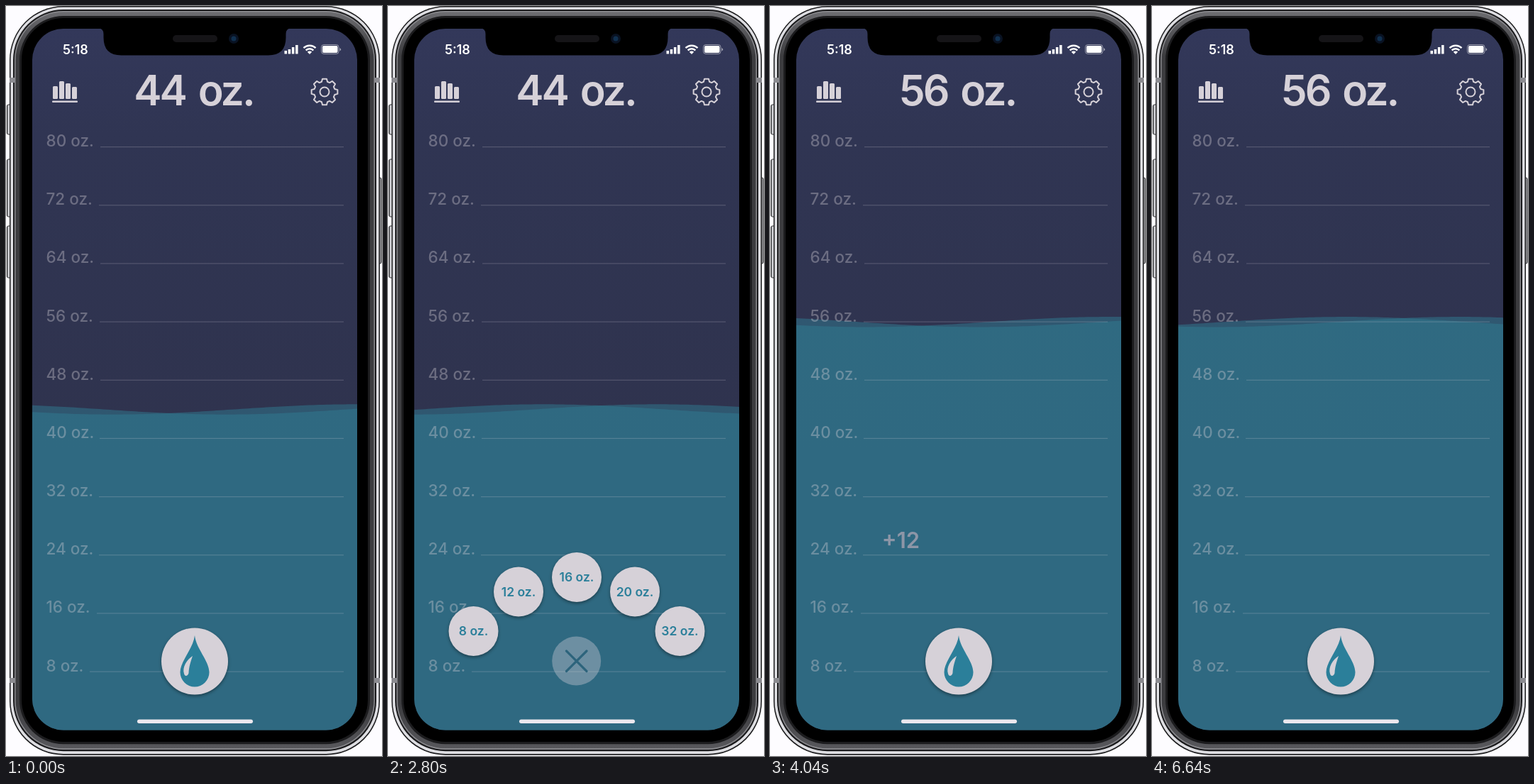
Animation, 530 px wide and 1057 px high, one loop 6680 ms. Source, as an HTML page:

```html
<!DOCTYPE html>
<html lang="en">
<head>
<meta charset="utf-8">
<title>Water tracker</title>
<style>
  html, body { margin: 0; width: 100%; height: 100%; overflow: hidden; background: #fdfcff; }
  svg { display: block; width: 530px; height: 1057px; font-family: Inter, "Liberation Sans", sans-serif; }
  .pale { fill: #d6d1d8; }
  .teal { fill: #2b7f9a; }
  .raised { filter: drop-shadow(0 2px 2px rgba(0, 0, 0, .4)); }
  .label { font-size: 22.5px; font-weight: 500; }
  .choice { font-size: 17.5px; font-weight: 600; text-anchor: middle; }
  #total { font-size: 59px; font-weight: 600; letter-spacing: -3px; word-spacing: 6px; text-anchor: middle; }
  #plus { fill: #d0b6c2; font-size: 31px; font-weight: 600; text-anchor: middle; }
</style>
</head>
<body>
<svg viewBox="0 0 530 1057">
  <defs>
    <linearGradient id="sky" x2="0" y2="1">
      <stop stop-color="#33385a"/>
      <stop offset=".15" stop-color="#303553"/>
      <stop offset=".6" stop-color="#2f334e"/>
    </linearGradient>
    <linearGradient id="steel" x2="1" y2="0">
      <stop stop-color="#77777b"/>
      <stop offset=".5" stop-color="#e6e6ea"/>
      <stop offset="1" stop-color="#66666a"/>
    </linearGradient>
    <linearGradient id="rim" x2="0" y2="1">
      <stop stop-color="#6c6c70"/>
      <stop offset=".06" stop-color="#3c3c3f"/>
      <stop offset=".94" stop-color="#3c3c3f"/>
      <stop offset="1" stop-color="#58585c"/>
    </linearGradient>
    <clipPath id="screen"><rect x="37" y="32" width="458" height="988.500" rx="44"/></clipPath>
  </defs>

  <g id="keys" fill="url(#steel)" stroke="#2a2a2c"></g>
  <g id="body"></g>
  <path d="M5 101h8v7h-8zM519 101h8v7h-8zM5 947h8v7h-8zM519 947h8v7h-8z" fill="#8b8b90"/>

  <g clip-path="url(#screen)">
    <rect x="37" y="32" width="458" height="989" fill="url(#sky)"/>
    <g fill="#307d92" fill-opacity=".5"><path class="wave"/><path class="wave"/></g>
    <g id="scale" class="pale"></g>

    <text x="80" y="67.500" fill="#fff" font-size="18" font-weight="600">5:18</text>
    <text id="total" class="pale" x="264.500" y="140"></text>
    <g class="pale">
      <rect x="66" y="113" width="7" height="18" rx="1.500"/>
      <rect x="75" y="106" width="7" height="25" rx="1.500"/>
      <rect x="84" y="109" width="7" height="22" rx="1.500"/>
      <rect x="93" y="114" width="7" height="17" rx="1.500"/>
      <rect x="65" y="133.500" width="36" height="2.500" rx="1"/>
    </g>
    <g fill="none" stroke="#d6d1d8" stroke-width="2" stroke-linejoin="round">
      <path id="gear"/>
      <circle cx="449" cy="121" r="6.500"/>
    </g>

    <text id="plus" x="184.500"></text>
    <g id="close">
      <circle class="pale" cx="265.700" cy="923" r="34.500" opacity=".37"/>
      <path d="M251.500 909l28.500 28.500m0-28.500l-28.500 28.500" stroke="#2d647c" stroke-width="3.200" stroke-linecap="round"/>
    </g>
    <g id="menu"></g>
    <g id="drop" class="raised">
      <circle class="pale" cx="266" cy="923.500" r="47"/>
      <path class="teal" d="M266 887C268 906 286.500 923 286.500 939A20.500 20.500 0 0 1 245.500 939C245.500 923 264 906 266 887Z"/>
      <path class="pale" d="M263 916C255 921 248 932 251 941C252 946 257 944 257.500 940C258 931 260 925 263 916Z"/>
    </g>
    <rect x="185" y="1005.500" width="163" height="5.500" rx="2.750" fill="#ece8ee"/>
  </g>

  <path d="M129 31q8.500 0 8.500 8.500v5q0 25 25 25h207q25 0 25-25v-5q0-8.500 8.500-8.500z"/>
  <rect x="235" y="41" width="63" height="10" rx="5" fill="#151417"/>
  <circle cx="321" cy="46" r="7" fill="#091222"/>
  <circle cx="321" cy="46" r="3.500" fill="#10304f"/>

  <g fill="#fff">
    <path d="M392.500 63h3.500v4.500h-3.500zM397.700 61h3.500v6.500h-3.500zM402.900 58h3.500v9.500h-3.500zM408.100 55h3.500v12.500h-3.500z"/>
    <path d="M428 68l-3.200-3.300a4.600 4.600 0 0 1 6.400 0z"/>
    <rect x="446" y="56" width="21.500" height="10" rx="2"/>
    <path d="M470.500 59v4.500q1.600-.8 1.600-2.250t-1.600-2.250z" opacity=".6"/>
  </g>
  <g fill="none" stroke="#fff">
    <path d="M419.500 59.200a12.200 12.200 0 0 1 17 0M422.700 62.500a7.600 7.600 0 0 1 10.600 0" stroke-width="2.500"/>
    <rect x="444.500" y="54.500" width="24.500" height="13" rx="3.500" opacity=".5"/>
  </g>
</svg>
<script>
const $ = id => document.getElementById(id);
const LOOP = 6680, HUB = { x: 266, y: 923.5 };
const UNIT = 82.17 / 8; // pixels per ounce

// Phone shell: nested rounded rectangles, [distance from the screen, fill]
$('body').innerHTML = [
  [32, '#1b1b1d'], [30.5, '#dedee2'], [27, '#1a1a1c'], [25, '#8a8a8e'],
  [23.5, 'url(#rim)'], [18, '#1c1c1e'], [15, '#000']
].map(([d, fill]) =>
  `<rect x="${37 - d}" y="${32 - d}" width="${458 + 2 * d}" height="${988.5 + 2.1 * d}" rx="${44 + d}" fill="${fill}"/>`
).join('');

$('keys').innerHTML = [[1.5, 139, 42], [1.5, 216, 81], [1.5, 310, 73], [523, 242, 121]]
  .map(([x, y, h]) => `<rect x="${x}" y="${y}" width="6" height="${h}" rx="2"/>`).join('');

$('scale').innerHTML = [133, 131, 133, 132, 133, 132, 131, 131, 128, 118].map((x, i) => {
  const y = 198.5 + i * 8 * UNIT;
  return `<text class="label" x="56.500" y="${y - .5}" opacity=".36">${80 - 8 * i} oz.</text>
    <rect x="${x}" y="${y - .5}" width="${476 - x}" height="1.200" opacity=".22"/>`;
}).join('');

const teeth = [];
for (let i = 0; i < 8; i++) {
  for (const [da, r] of [[-16, 14.8], [-9, 18.6], [9, 18.6], [16, 14.8]]) {
    const a = (i * 45 + da) * Math.PI / 180;
    teeth.push(`${(449 + r * Math.sin(a)).toFixed(2)} ${(121 - r * Math.cos(a)).toFixed(2)}`);
  }
}
$('gear').setAttribute('d', `M${teeth.join('L')}Z`);

const choices = [[8, -145.5, -42.5], [12, -82, -98], [16, 0, -118.5], [20, 82, -98], [32, 145.5, -42.5]];
$('menu').innerHTML = choices.map(([oz]) =>
  `<g class="raised"><circle class="pale" r="35"/><text class="choice teal" y="6.300">${oz} oz.</text></g>`
).join('');
$('plus').textContent = '+12';

const ramp = (t, from, to) => Math.min(1, Math.max(0, (t - from) / (to - from)));
const smooth = p => p * p * (3 - 2 * p);
const waves = document.querySelectorAll('.wave');

function wavePath(level, trough) {
  let d = 'M37 1021';
  for (let x = 37; x <= 497; x += 5) {
    const y = level + 7.2 * Math.cos((x - trough) * 2 * Math.PI / 687);
    d += `L${x} ${y.toFixed(2)}`;
  }
  return d + 'V1021Z';
}

function draw(t) {
  const level = 568.5 - 12 * UNIT * smooth(ramp(t, 3440, 3960));
  const trough = 230 - 687 * t / 2000;
  waves.forEach((w, i) => w.setAttribute('d', wavePath(level, trough + (i ? 80 : -80))));

  $('total').textContent = t < 3400 ? '44 oz.' : '56 oz.';

  const open = smooth(ramp(t, 1600, 1960)) - smooth(ramp(t, 3240, 3484));
  [...$('menu').children].forEach((g, i) => {
    const [, dx, dy] = choices[i];
    g.setAttribute('transform', `translate(${HUB.x + dx * open} ${HUB.y + dy * open})`);
    g.setAttribute('opacity', open ** 1.3);
  });
  $('drop').setAttribute('opacity', 1 - open);
  $('close').setAttribute('opacity', ramp(open, .5, 1));

  const rise = ramp(t, 3400, 4400);
  $('plus').setAttribute('y', 837 - 114 * rise);
  $('plus').setAttribute('opacity', rise > 0 ? 1 - rise * rise : 0);
}

const start = performance.now();
function tick() {
  draw((performance.now() - start) % LOOP);
  requestAnimationFrame(tick);
}
tick();
</script>
</body>
</html>
```
